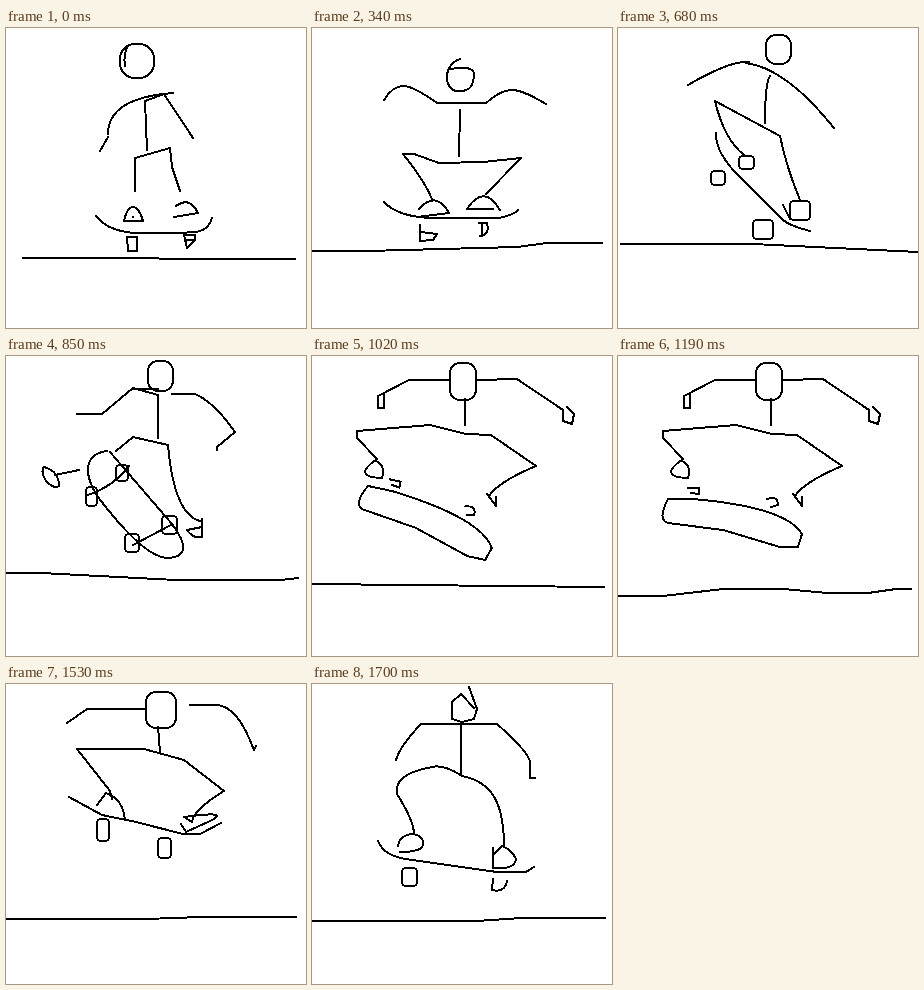
Recreate the animation shown at these times as an HTML page without scripts. Size 300 px wide and 300 px high, loop 1.87 s.

```html
<!DOCTYPE html>
<html lang="en">
<head>
<meta charset="utf-8">
<title>Kickflip</title>
<style>
  html, body { margin: 0; width: 100%; height: 100%; overflow: hidden; background: #fff; }
  svg { display: block; width: 100%; height: 100%; }
  path, rect { vector-effect: non-scaling-stroke; }
  rect { rx: 4px; }
  .head { rx: 10px; }
  .round { rx: 15px; }
  .pose {
    fill: none; stroke: #000; stroke-width: 2;
    stroke-linecap: round; stroke-linejoin: round;
    shape-rendering: crispEdges;
    visibility: hidden;
    animation: pose 1870ms step-end infinite;
    animation-delay: calc(var(--n) * 170ms - 1870ms);
  }
  @keyframes pose {
    0% { visibility: visible; }
    9.0909%, 100% { visibility: hidden; }
  }
</style>
</head>
<body>
<svg viewBox="0 0 300 300">
  <!-- rolling -->
  <g class="pose" style="--n:0">
    <rect class="round" x="114" y="16" width="34" height="34"/>
    <path d="M122 18Q117 26 119 38"/>
    <path d="M94 123L102 109M102 106Q102 70 167 65M141 122L139 73 158 66 187 110"/>
    <path d="M129 163V130L164 120 166 139 174 163"/>
    <path d="M118 193Q121 179 127 179T137 193ZM127 189h.1M170 178Q184 168 192 185L168 189"/>
    <g id="deck">
      <path d="M90 188Q100 201 120 204T190 204Q203 202 206 190"/>
      <path d="M121 209H131V223H122ZM178 207L181 220 189 212V207ZM179 212H189"/>
    </g>
    <path d="M17 230L289 231"/>
  </g>

  <!-- bending -->
  <g class="pose" style="--n:1">
    <use href="#crouch" transform="translate(0 -14) scale(1 1.12)"/>
    <use href="#deck" transform="translate(-8 -5)"/>
    <path d="M1 232L289 228"/>
  </g>

  <!-- crouched -->
  <g class="pose" style="--n:2">
    <g id="crouch">
      <path d="M148 31C130 37 132 62 145 63S162 58 162 45Q159 37 139 41"/>
      <path d="M72 72C85 51 97 55 125 75H174C196 57 203 58 234 76M148 82L147 128"/>
      <path d="M120 171Q112 152 91 126H102L127 135 171 134 209 130 174 166"/>
      <path d="M107 181Q124 162 137 185L105 189M188 182Q172 155 155 181H181"/>
    </g>
    <g id="low">
      <path d="M72 174Q86 189 120 190H187Q202 187 206 182"/>
      <path d="M108 197V213L121 212 125 206 109 204M167 195H175Q178 207 168 208M170 195V208"/>
    </g>
    <path d="M0 223H55L205 219 235 215H290"/>
  </g>

  <!-- popping -->
  <g class="pose" style="--n:3">
    <use href="#crouch" transform="translate(2 -8)"/>
    <use href="#low" transform="rotate(9 190 190) translate(0 -2)"/>
    <path d="M0 219L290 225"/>
  </g>

  <!-- leaping -->
  <g class="pose" style="--n:4">
    <rect class="head" x="148" y="7" width="25" height="29"/>
    <path d="M70 57Q113 32 131 34M128 35Q168 40 216 100M152 48Q147 55 147 95"/>
    <path d="M126 127Q106 111 97 73L162 108Q168 138 182 172M165 177L172 191"/>
    <rect x="121" y="128" width="15" height="13"/>
    <rect x="172" y="173" width="20" height="19"/>
    <path d="M98 105Q97 126 125 152L165 192Q172 198 192 203"/>
    <rect x="93" y="143" width="14" height="14"/>
    <rect x="135" y="192" width="20" height="19"/>
    <path d="M3 216H135L300 224"/>
  </g>

  <!-- kicking -->
  <g class="pose" style="--n:5">
    <rect class="head" x="142" y="5" width="25" height="30"/>
    <path d="M71 58H96L127 32 152 39V82M127 33H152M166 38H189Q208 46 229 76L211 91V94"/>
    <path d="M110 95L127 81 162 89Q168 158 194 165"/>
    <path d="M196 163V181Q187 183 181 174L196 171M38 111C32 118 45 135 53 130Q53 115 38 111M49 119L73 114"/>
    <path d="M101 95C78 98 77 118 92 141Q139 203 163 202C183 200 180 187 166 168L104 96"/>
    <path d="M82 139Q108 130 123 110M127 189L165 169"/>
    <rect x="80" y="131" width="11" height="19"/>
    <rect x="110" y="109" width="12" height="16"/>
    <rect x="119" y="178" width="14" height="18"/>
    <rect x="156" y="160" width="15" height="18"/>
    <path d="M0 217H35L170 224H275L292 222"/>
  </g>

  <!-- spinning -->
  <g class="pose" style="--n:6">
    <use href="#air"/>
    <use href="#side" transform="rotate(12 115 165)"/>
    <path d="M0 228L292 231"/>
  </g>

  <!-- floating -->
  <g class="pose" style="--n:7">
    <g id="air">
      <rect class="head" x="138" y="7" width="26" height="37"/>
      <path d="M138 24H97L66 40V52H72V39M166 24L205 23 251 54V65L260 68 262 58 255 51M153 43V69"/>
      <path d="M65 103L45 82V75L118 69 154 78 179 79 224 110Q186 126 177 140"/>
      <path d="M65 103Q39 121 70 122 74 110 64 105M175 138L184 150V141"/>
    </g>
    <g id="side">
      <path d="M50 143Q39 164 50 167L105 174 162 191H180L184 178Q168 151 75 143Z"/>
      <path d="M70 132H81V138L73 137M149 143Q160 139 160 149L153 151"/>
    </g>
    <path d="M0 240H45L105 233H165L210 237H250L278 233H293"/>
  </g>

  <!-- catching -->
  <g class="pose" style="--n:8">
    <use href="#catch" transform="translate(-1 -2)"/>
    <use href="#caught" transform="translate(-4 4)"/>
    <path d="M0 236L291 233"/>
  </g>

  <!-- caught -->
  <g class="pose" style="--n:9">
    <g id="catch">
      <rect class="head" x="140" y="8" width="30" height="36"/>
      <path d="M61 39L81 25H138M184 21H209Q231 20 248 66L250 62M152 43L154 68"/>
      <path d="M106 115L104 107 71 65H138L178 76 218 107Q187 126 186 138"/>
      <path d="M91 121L100 109Q117 115 119 136M186 138L178 133Q228 126 202 138L180 148 175 140"/>
    </g>
    <g id="caught">
      <path d="M63 113L96 131 130 138 177 150H194L215 139"/>
      <rect x="91" y="135" width="12" height="22"/>
      <rect x="152" y="154" width="13" height="20"/>
    </g>
    <path d="M0 235H140L195 233H290"/>
  </g>

  <!-- landing -->
  <g class="pose" style="--n:10">
    <path d="M157 3L165 25 162 35 150 38 140 35V18L149 10 162 24"/>
    <path d="M84 76Q88 62 109 40H185Q218 69 218 79V94H223M149 40V91"/>
    <path d="M102 150Q102 137 85 110V104Q87 89 120 83 132 80 150 92C182 98 192 122 192 163"/>
    <path d="M86 162C88 146 112 147 111 160Q111 168 88 168M181 164V184Q203 186 204 175 200 166 190 162L181 171"/>
    <path d="M66 157Q72 173 100 176L185 188H214L222 183"/>
    <rect x="90" y="184" width="15" height="18"/>
    <path d="M181 195L180 206Q193 209 195 197"/>
    <path d="M0 237H165L210 234H293"/>
  </g>
</svg>
</body>
</html>
```
